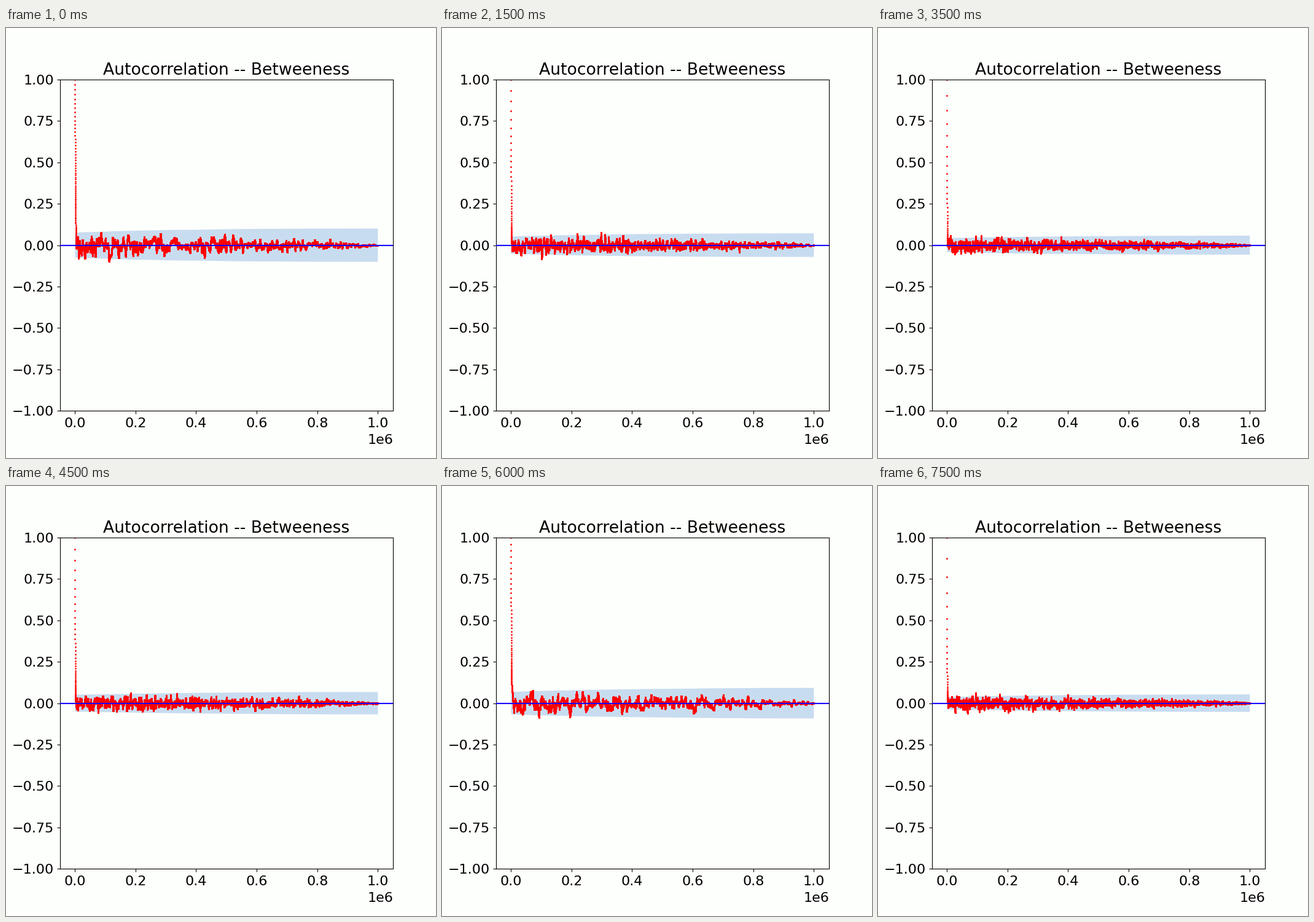
Write a matplotlib script that moves like this. It is 700x700 px and loops after 8 s.

```python
import numpy as np
import matplotlib.pyplot as plt
from matplotlib.animation import FuncAnimation
from matplotlib.patches import Polygon

N = 20000            # samples per chain
SPACING = 50         # steps between samples
GROUPS, PER_GROUP = 4, 4
PAPER = "#fdfffc"

lags = np.arange(N)
steps = lags * SPACING


def lag_one(i):
    """Each group starts slow and mixes faster; later groups go further."""
    group, member = divmod(i, PER_GROUP)
    progress = (member / (PER_GROUP - 1)) ** 0.75
    slowest = 0.031 + 0.003 * group
    fastest = 0.067 + 0.060 * (group / (GROUPS - 1)) ** 0.6
    return 1 - (slowest + (fastest - slowest) * progress)


def sample_acf(rho, seed):
    """Autocorrelation of a simulated first-order autoregressive chain."""
    rng = np.random.default_rng(seed)
    size = 1 << 16       # padded so the correlation does not wrap
    spectrum = np.fft.rfft(rng.normal(size=N), size)
    chain = np.fft.irfft(spectrum * np.fft.rfft(rho ** lags, size), size)[:N]
    power = np.abs(np.fft.rfft(chain - chain.mean(), size)) ** 2
    acf = np.fft.irfft(power, size)[:N]
    return acf / acf[0]


def chain_acf(i):
    """Exact decay at short lags, sampling noise further out."""
    rho = lag_one(i)
    decay = rho ** lags
    return decay + 0.9 * (sample_acf(rho, 40 + i) - decay) * (1 - decay)


def confidence(acf):
    """Bartlett half-width for lags from one upward."""
    total = np.concatenate([[0], np.cumsum(acf[1:-1] ** 2)])
    return 1.96 * np.sqrt((1 + 2 * total) / N)


plt.rcParams.update({"font.family": "DejaVu Sans", "font.size": 16})
fig, ax = plt.subplots(figsize=(7, 7), dpi=100, facecolor=PAPER)
ax.set_facecolor(PAPER)
ax.set_title("Autocorrelation -- Betweeness")
ax.set_xlim(-0.05e6, 1.05e6)
ax.set_ylim(-1, 1)
ax.set_xticks(np.linspace(0, 1e6, 6))
ax.set_yticks(np.linspace(-1, 1, 9))
ax.tick_params(axis="x", pad=4.5)
ax.xaxis.OFFSETTEXTPAD = 4.8

band = Polygon([(0, 0), (1, 0), (1, 1)], color="#c8dcf0", lw=0)
ax.add_patch(band)
dots, = ax.plot([], [], "o", color="red", markersize=1)
ax.axhline(0, color="#1c00ff", lw=1.5, zorder=3)


def update(i):
    acf = chain_acf(i)
    half = confidence(acf)
    x = steps[1:]
    band.set_xy(np.column_stack([np.concatenate([x, x[::-1]]),
                                 np.concatenate([half, -half[::-1]])]))
    dots.set_data(steps, acf)
    return band, dots


anim = FuncAnimation(fig, update, frames=GROUPS * PER_GROUP, interval=500,
                     repeat=True, repeat_delay=0)
plt.show()
```
